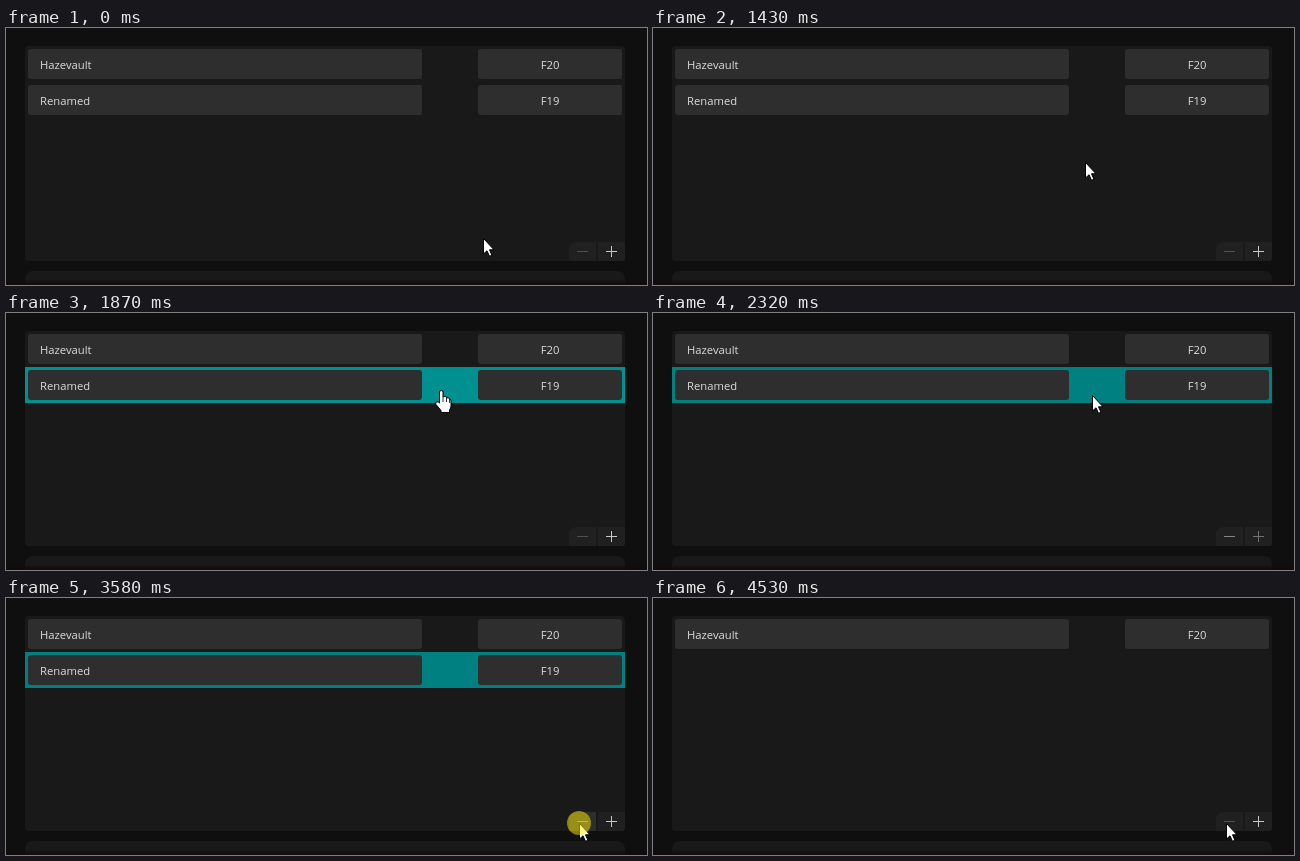
Recreate the animation shown at these times as an HTML page. Size 641 by 257 pixels, loop 4910 ms.

```html
<!DOCTYPE html>
<html lang="en">
<head>
<meta charset="utf-8">
<title>Removing a list entry</title>
<style>
html, body { margin: 0; width: 100%; height: 100%; overflow: hidden; background: #0f0f0f; }
svg { display: block; }
text { font: 11.25px "Open Sans", "Noto Sans", sans-serif; fill: #dcdcdc; }
.mid { text-anchor: middle; }
.field { fill: #2e2e2e; }
.panel { fill: #191919; }
.button { fill: #202020; }
.cursor { fill: #fff; stroke: #000; stroke-linejoin: round; }
</style>
</head>
<body>
<svg width="641" height="257" viewBox="0 0 641 257">
  <defs>
    <linearGradient id="fade" x2="0" y2="1">
      <stop stop-color="#120a0a" stop-opacity="0"/>
      <stop offset="1" stop-color="#120a0a"/>
    </linearGradient>
  </defs>
  <rect class="panel" x="19" y="18" width="600" height="215" rx="4"/>
  <rect class="panel" x="19" y="243" width="600" height="30" rx="8"/>
  <rect y="251" width="641" height="6" fill="url(#fade)"/>

  <g>
    <rect class="field" x="22" y="21" width="394" height="30" rx="3"/>
    <rect class="field" x="472" y="21" width="144" height="30" rx="3"/>
    <text x="34" y="41">Hazevault</text>
    <text class="mid" x="544" y="41">F20</text>
  </g>
  <g id="row">
    <rect id="highlight" x="19" y="54" width="600" height="36"/>
    <rect class="field" x="22" y="57" width="394" height="30" rx="3"/>
    <rect class="field" x="472" y="57" width="144" height="30" rx="3"/>
    <text x="34" y="77">Renamed</text>
    <text class="mid" x="544" y="77">F19</text>
  </g>

  <path id="minusButton" class="button" d="M563 233V222Q563 214 571 214H590V233Z"/>
  <path class="button" d="M592 214H619V230Q619 233 616 233H592Z"/>
  <path id="minus" d="M571 223.5H582"/>
  <path id="plus" d="M600 223.5H611M605.5 218V229"/>

  <g id="pointer" class="cursor">
    <path id="arrow" d="M.5 .5V16L4 12.800L6.500 18.300L8.900 17.200L6.500 11.800H11Z"/>
    <g id="hand">
      <path d="M-1.500 13V2Q-1.500 .5 .3 .5T2 2V7Q3 6 4.500 6.500T5.500 8Q7.500 7 8.500 9Q10 8.500 10 11V16Q10 18 8.500 20V22.500H0V20.500L-5 14.500Q-6 13-4.500 12T-1.500 13Z"/>
      <path d="M2 7V12M5.500 8V12M8.500 9V13" stroke-width=".8"/>
    </g>
  </g>
  <circle id="press" r="12" fill="#fff000" opacity=".5"/>
</svg>
<script>
const LOOP = 4910;
const $ = id => document.getElementById(id);
const show = (id, on) => $(id).setAttribute('visibility', on ? 'visible' : 'hidden');
const set = (id, name, value) => $(id).setAttribute(name, value);

// Each move: first step time, last step time, steps, end point
const start = [477, 210];
const moves = [
  [30, 130, 4, 432, 136],
  [1430, 1870, 14, 435, 77],
  [2320, 2820, 16, 557, 220],
  [2850, 3140, 8, 573, 225]
];

function ease(u) {
  const k = u ** 0.8;
  return k * k * (3 - 2 * k);
}

function pointerAt(t) {
  let [x, y] = start;
  for (const [t0, t1, steps, endX, endY] of moves) {
    if (t < t0) break;
    const done = Math.floor((t - t0) / (t1 - t0) * (steps - 1) + 0.001) + 1;
    const k = ease(Math.min(1, done / steps));
    x += (endX - x) * k;
    y += (endY - y) * k;
  }
  return [Math.round(x), Math.round(y)];
}

function draw(now) {
  const t = now % LOOP;
  const [x, y] = pointerAt(t);
  const selected = t >= 2000 && t < 3610;
  const overRow = t < 2000 && y < 90;
  const overMinus = selected && x >= 563;
  const hand = t < 2030 && y < 90;
  const plusDim = selected && !overMinus || t >= 3610 && t < 4530;

  show('row', t < 3610);
  set('highlight', 'fill', selected ? '#008080' : overRow ? '#009090' : 'none');
  set('minusButton', 'style', overMinus ? 'fill:#2e2e2e' : '');
  set('minus', 'stroke', selected ? '#858585' : '#505050');
  set('plus', 'stroke', plusDim ? '#707070' : '#c8c8c8');

  const at = `translate(${x} ${y})`;
  set('pointer', 'transform', at);
  set('press', 'transform', at);
  show('arrow', !hand);
  show('hand', hand);
  show('press', t >= 1970 && t < 2110 || t >= 3580 && t < 3750);
}

function frame() {
  draw(performance.now());
  requestAnimationFrame(frame);
}
frame();
</script>
</body>
</html>
```
